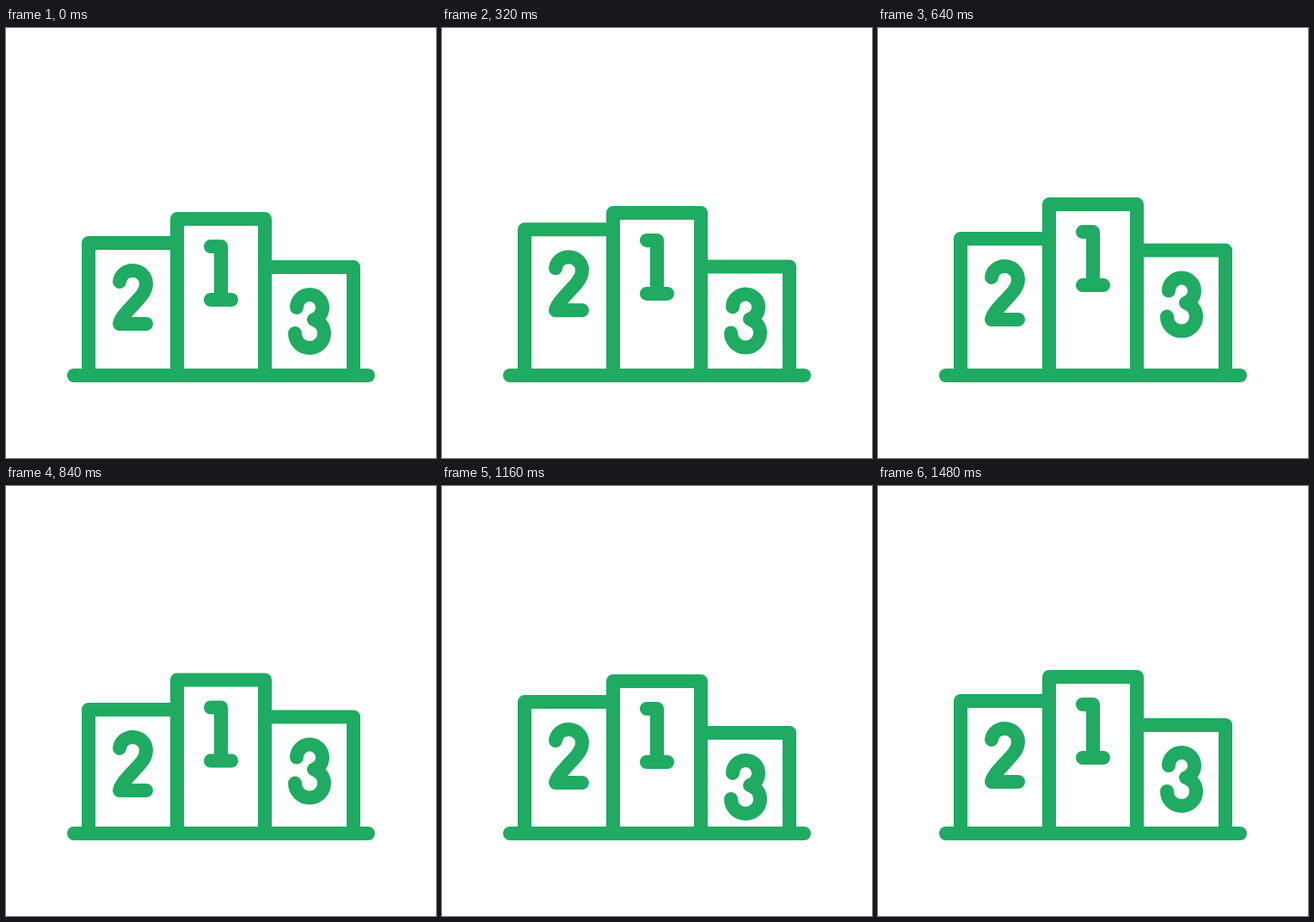
An HTML page that plays this animation: 500x500 px, repeating every 1.56 s.

```html
<!DOCTYPE html>
<html lang="en">
<head>
<meta charset="utf-8">
<title>Podium</title>
<style>
  html, body { margin: 0; width: 100%; height: 100%; overflow: hidden; background: #fff; }
  svg { display: block; width: 100%; height: 100%; }
  path { fill: none; stroke: #1fab61; stroke-width: 16; stroke-linecap: round; stroke-linejoin: round; }
</style>
</head>
<body>
<svg viewBox="0 0 500 500">
  <path d="M79 404H421"/>
  <path id="box2"/>
  <path id="box1"/>
  <path id="box3"/>
  <path id="num2" d="M132 295C133 287.5 139 282 147.3 282C156 282 163 288.8 163 297C163 303.5 160.5 308 156 313L141 329.5C136 335 133 339.5 132 344H163"/>
  <path id="num1" d="M238 254H250V316M238 316H262"/>
  <path id="num3" d="M338 325C338 317 344.5 310 353 310C361.5 310 368 317 368 325C368 332 364 337 358 339C365 341.5 370 347.5 370 355C370 364.5 362.5 372 353 372C343.5 372 336 364.5 336 355"/>
</svg>
<script>
const LOOP = 1560, STEP = 40, SEG = 400, BASE = 404;
const heights = [0, -20, 10, 0];

const blocks = [
  { id: 2, delay: 40, outline: dy => `M96 ${BASE}V${250 + dy}H199` },
  { id: 1, delay: 160, outline: dy => `M199 ${BASE}V${222 + dy}H301V${BASE}` },
  { id: 3, delay: 280, outline: dy => `M301 ${278 + dy}H404V${BASE}` }
].map(b => ({
  ...b,
  box: document.getElementById('box' + b.id),
  num: document.getElementById('num' + b.id)
}));

const ease = u => u * u * (3 - 2 * u);

// Rise, dip below rest, then settle; each leg is eased.
function offset(t) {
  const p = Math.min(Math.max(t / SEG, 0), 3);
  const i = Math.min(Math.floor(p), 2);
  return heights[i] + (heights[i + 1] - heights[i]) * ease(p - i);
}

function draw(ms) {
  const t = Math.floor((ms % LOOP) / STEP) * STEP;
  for (const b of blocks) {
    const dy = offset(t - b.delay);
    b.box.setAttribute('d', b.outline(dy));
    b.num.setAttribute('transform', `translate(0 ${dy})`);
  }
}

const start = performance.now();
function tick() {
  draw(performance.now() - start);
  requestAnimationFrame(tick);
}
tick();
</script>
</body>
</html>
```
